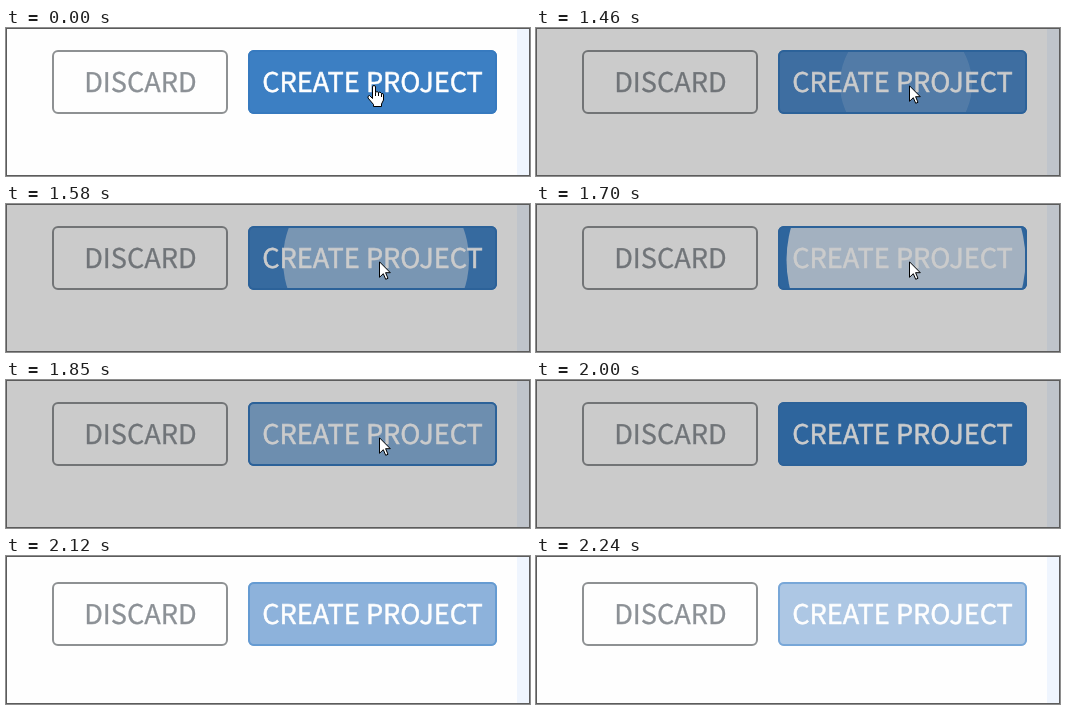
An HTML page for the animation above (3.78 s loop, 524 px wide and 148 px high).

```html
<!DOCTYPE html>
<html lang="en">
<head>
<meta charset="utf-8">
<title>Create project</title>
<style>
  html, body { margin: 0; width: 100%; height: 100%; overflow: hidden; background: #fefefe; }
  svg { display: block; width: 524px; height: 148px; }
  text {
    font: 400 27.15px "Noto Sans CJK SC", "Noto Sans CJK JP", "Noto Sans", sans-serif;
    text-rendering: geometricPrecision;
  }
  .label { fill: #8c9196; stroke: #8c9196; stroke-width: .3px; }
  .label.main { fill: #fefefe; stroke: #fefefe; stroke-width: .5px; }
  .bar, .fill, .edge, .dim, .ripple, .hand, .arrow { animation: 3780ms step-end infinite; }
  .bar { animation-name: bar; }
  .fill { animation-name: fill; }
  .edge { animation-name: edge; }
  .dim { animation-name: dim; }
  .ripple { animation-name: ripple; }
  .hand { animation-name: hand; }
  .arrow { animation-name: arrow; }

  /* 1460 = 38.624%, 1580 = 41.799%, 1700 = 44.974%, 1850 = 48.942%,
     2000 = 52.910%, 2120 = 56.085%, 2240 = 59.259% */
  @keyframes bar {
    0% { transform: none; }
    56.085%, 100% { transform: translateY(4px); }
  }
  @keyframes fill {
    0% { fill: #3c7fc3; }
    38.624% { fill: #4d89c9; }
    41.799% { fill: #4484c7; }
    44.974% { fill: #3a7ec4; }
    56.085% { fill: #8db2db; }
    59.259%, 100% { fill: #adc7e4; }
  }
  @keyframes edge {
    0% { stroke: #377abf; }
    56.085% { stroke: #659bd2; }
    59.259%, 100% { stroke: #78a7d8; }
  }
  @keyframes dim {
    0% { opacity: 0; }
    38.624% { opacity: .2; }
    56.085%, 100% { opacity: 0; }
  }
  @keyframes ripple {
    0% { r: 0; opacity: 0; }
    38.624% { r: 66px; opacity: .15; }
    41.799% { r: 93px; opacity: .45; }
    44.974% { r: 119.5px; opacity: .74; }
    48.942% { r: 140px; opacity: .4; }
    52.910%, 100% { r: 140px; opacity: 0; }
  }
  @keyframes hand {
    0% { opacity: 1; }
    38.624%, 100% { opacity: 0; }
  }
  @keyframes arrow {
    0% { opacity: 0; }
    38.624% { opacity: 1; }
    52.910%, 100% { opacity: 0; }
  }
</style>
</head>
<body>
<svg viewBox="0 0 524 148">
  <defs>
    <clipPath id="inner"><rect x="244" y="24" width="245" height="60" rx="4"/></clipPath>
  </defs>
  <rect width="524" height="148" fill="#fefefe"/>
  <rect x="511" width="12" height="148" fill="#eff5fe"/>

  <g class="bar">
    <rect x="47" y="23" width="174" height="62" rx="5" fill="none" stroke="#8e9193" stroke-width="2"/>
    <text class="label" x="78.200" y="64.200">DISCARD</text>
    <rect class="fill" x="242" y="22" width="249" height="64" rx="6"/>
    <rect class="edge" x="243" y="23" width="247" height="62" rx="5" fill="none" stroke-width="2"/>
    <g clip-path="url(#inner)"><circle class="ripple" cx="370" cy="56" fill="#fff"/></g>
    <text class="label main" x="256.200" y="64.200">CREATE PROJECT</text>
  </g>

  <rect class="dim" x="1" y="1" width="522" height="146"/>

  <g fill="#fff" stroke="#000" stroke-linejoin="round">
    <path class="hand" transform="translate(361 57)"
      d="M5.5 13.5V2Q5.500 .5 7 .5T8.500 2V7.500Q10 5.500 11.500 7.500Q13 6 14.500 8.500Q16.500 8 16.500 10V15L14.500 19V21.500H6.500V19.500L1 13Q.3 11 2.500 10.500Z
         M8.500 7.500V11M11.500 7.500V11M14.500 8.500V12"/>
    <path class="arrow" transform="translate(373 57)"
      d="M.5 .8V16.300L4.300 12.700L6.700 18.300L9 17.300L6.600 11.700H11.300Z"/>
  </g>
  <rect x=".5" y=".5" width="523" height="147" fill="none" stroke="#5c5c5c"/>
</svg>
</body>
</html>
```
